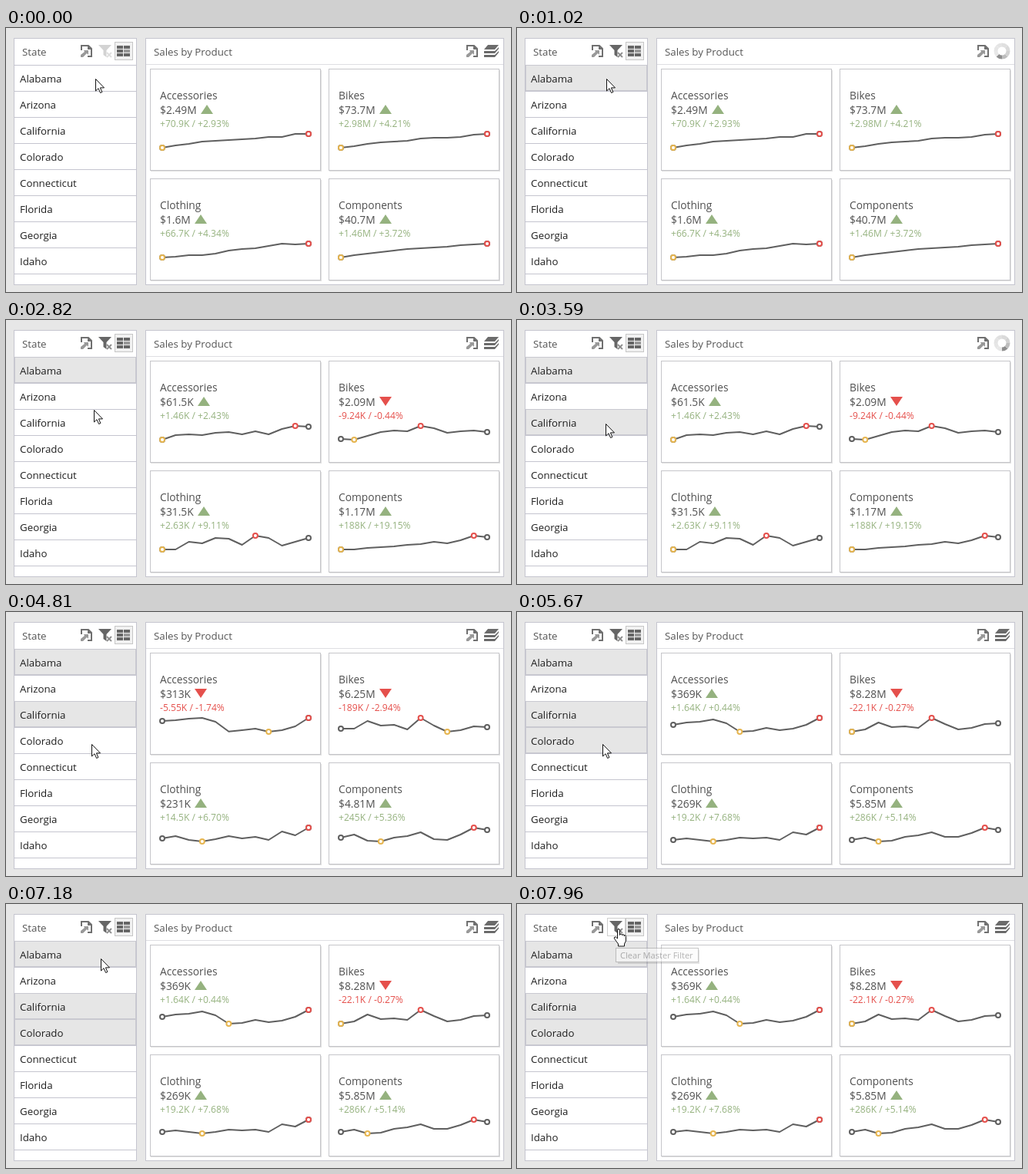
An HTML page that plays this animation: 656x344 px, repeating every 7990 ms.

```html
<!DOCTYPE html>
<html lang="en">
<head>
<meta charset="utf-8">
<title>Sales dashboard</title>
<style>
  html, body { margin: 0; width: 100%; height: 100%; overflow: hidden; background: #e7e7e7; }
  svg { display: block; }
  text { font: 13.3px "Open Sans", "Noto Sans", sans-serif; white-space: pre; }
  .head { fill: #555; }
  .row { fill: #1f1f1f; }
  .name, .value { font-size: 13.8px; fill: #505050; }
  .delta { font-size: 12.1px; }
  .tip { font-size: 11.1px; fill: #777; }
</style>
</head>
<body>
<svg width="656" height="344" viewBox="0 0 656 344">
  <defs>
    <g id="export">
      <path d="M98 29V23H107L111 27V37H106" fill="none" stroke="#707070" stroke-width="2"/>
      <path d="M106 22V28H112Z" fill="#707070"/>
      <path d="M101 29H107V35L105 33L100 38H97V35L102 31Z" fill="#999"/>
    </g>
  </defs>
  <g fill="#fff" stroke="#c5c5cf">
    <rect x="10.5" y="13.5" width="159" height="321"/>
    <rect x="181.5" y="13.5" width="465" height="321"/>
    <path d="M11 48.5H169"/>
    <path d="M182 47.5H646" stroke="#dedee2"/>
  </g>
  <text class="head" x="21" y="36">State</text>
  <text class="head" x="192" y="36">Sales by Product</text>
  <use href="#export"/>
  <use href="#export" x="501"/>
  <rect id="hover" x="117.5" y="18.5" width="23" height="23" fill="#fff" stroke="#cfcfcf"/>
  <g id="filter">
    <path d="M120 22H137L130.500 29V38L126.500 35V29Z" fill="currentColor"/>
    <path d="M131 32L137 38M137 32L131 38" stroke="currentColor" stroke-width="1.8" opacity=".75"/>
  </g>
  <rect x="141.500" y="18.500" width="23" height="23" fill="#f1f1f1" stroke="#c6c6c6"/>
  <path d="M144 23h8v4h-8zM153 23h8v4h-8zM144 28h8v4h-8zM144 33h8v4h-8zM153 33h8v4h-8z" fill="#666"/>
  <path d="M153 28h8v4h-8z" fill="#999"/>
  <g id="layers" fill="#6b6b6b">
    <path d="M626 22H640L635 28H621Z"/>
    <path d="M621 30H635L640 25V27L635 33H621Z"/>
    <path d="M621 35H635L640 30V32L635 38H621Z"/>
  </g>
  <g id="spinner" fill="none" stroke-width="5"></g>
  <g id="rows"></g>
  <g id="cards"></g>
  <g id="tip">
    <rect x="131" y="60" width="106" height="18" fill="#000" opacity=".2"/>
    <rect x="128.500" y="57.500" width="107" height="18" fill="#fafafa" stroke="#999"/>
    <text class="tip" x="134" y="71">Clear Master Filter</text>
  </g>
  <g id="cursor" fill="#fff" stroke="#111" stroke-linejoin="round">
    <path id="arrow" d="M.5 .5V16L4 12.700L6.600 18.500L8.900 17.500L6.400 11.900H11.500Z"/>
    <path id="hand" d="M-.5 13V2.200a1.500 1.500 0 0 1 3 0V8.500q0-1.500 1.500-1.500t1.500 1.500V9q0-1.300 1.400-1.300T8.300 9v1q0-1.200 1.100-1.200T10.500 10.500V16L8.500 20V23H.5V20L-4.300 13.500q-1.200-1.800 .3-2.500t3.500 2Z"/>
  </g>
</svg>
<script>
const LOOP = 7990;
const CLICKS = [990, 3590, 5440], LOADS = [1220, 3780, 5670], PICKED = [0, 2, 3];
const STATES = ["Alabama", "Arizona", "California", "Colorado", "Connecticut", "Florida", "Georgia", "Idaho"];
const PRODUCTS = ["Accessories", "Bikes", "Clothing", "Components"];
const GREEN = "#95b27f", RED = "#e5504c", GOLD = "#e6b54f", GREY = "#5f5f5f";
const $ = id => document.getElementById(id);
const show = (id, on) => $(id).setAttribute("visibility", on ? "visible" : "hidden");

// Each card: value, change, sparkline depths (0 = highest point, 18 = lowest).
const views = [];
const addView = (...cards) => views.push(cards);
addView(
  ["$2.49M", "+70.9K / +2.93%", [18, 15, 13, 10, 9, 8, 7, 6, 4, 4, 0, 0]],
  ["$73.7M", "+2.98M / +4.21%", [18, 16, 13, 11, 10, 9, 6, 5, 5, 4, 1, 0]],
  ["$1.6M", "+66.7K / +4.34%", [18, 17, 15, 15, 13, 9, 7, 6, 3, 0, 1, 0]],
  ["$40.7M", "+1.46M / +3.72%", [18, 15, 13, 11, 9, 7, 6, 5, 4, 2, 1, 0]]);
addView(
  ["$61.5K", "+1.46K / +2.43%", [18, 12, 11, 12, 9, 8, 11, 7, 11, 4, 0, 1]],
  ["$2.09M", "-9.24K / -0.44%", [17, 18, 13, 8, 6, 7, 0, 3, 9, 7, 6, 8]],
  ["$31.5K", "+2.63K / +9.11%", [18, 18, 8, 10, 3, 4, 12, 0, 3, 13, 8, 3]],
  ["$1.17M", "+188K / +19.15%", [18, 18, 16, 15, 14, 12, 11, 8, 10, 6, 0, 2]]);
addView(
  ["$313K", "-5.55K / -1.74%", [4, 3, 1, 0, 5, 17.7, 16, 14, 18, 16, 11, 0]],
  ["$6.25M", "-189K / -2.94%", [14, 14, 4, 10, 9, 15, 0, 10, 18, 16, 11, 12]],
  ["$231K", "+14.5K / +6.70%", [14, 11, 16, 18, 15, 11, 14, 12, 16, 5, 10, 0]],
  ["$4.81M", "+245K / +5.36%", [13, 9, 17, 18, 13, 11, 6, 15, 16, 9, 0, 3]]);
addView(
  ["$369K", "+1.64K / +0.44%", [9, 6, 5, 2, 7, 18, 17, 13, 16, 14, 9, 0]],
  ["$8.28M", "-22.1K / -0.27%", [18, 15, 6, 12, 11, 13, 0, 8, 15, 13, 8, 7]],
  ["$269K", "+19.2K / +7.68%", [16, 14, 16, 18, 16, 13, 14, 13, 16, 6, 9, 0]],
  ["$5.85M", "+286K / +5.14%", [16, 13, 18, 17, 12, 10, 6, 12, 12, 7, 0, 3]]);

// Cursor path: time, x, y.
const PATH = [
  [0, 116, 66], [2250, 116, 66], [2280, 116, 70], [2700, 114, 106], [3030, 115, 135],
  [4480, 115, 135], [4810, 111, 172], [6370, 111, 172], [6580, 117, 160], [7180, 123, 71],
  [7570, 131, 32], [LOOP, 131, 32]];

function cursorAt(t) {
  const i = PATH.findIndex(p => p[0] > t);
  const [t0, x0, y0] = PATH[i - 1], [t1, x1, y1] = PATH[i];
  const k = (t - t0) / (t1 - t0);
  return [Math.round(x0 + (x1 - x0) * k), Math.round(y0 + (y1 - y0) * k)];
}

function sparkline(depths) {
  const x = i => 16 + i * 190 / 11, y = i => 85 + depths[i];
  const dot = (i, color) =>
    `<circle cx="${x(i)}" cy="${y(i)}" r="3" fill="#fff" stroke="${color}" stroke-width="2"/>`;
  const line = depths.map((d, i) => `${x(i)},${y(i)}`).join(" ");
  return `<polyline points="${line}" fill="none" stroke="${GREY}" stroke-width="2" stroke-linejoin="round"/>`
    + dot(0, GREY) + dot(11, GREY) + dot(depths.indexOf(18), GOLD) + dot(depths.lastIndexOf(0), RED);
}

function drawCards(view) {
  $("cards").innerHTML = views[view].map(([value, delta, depths], i) => {
    const up = delta[0] === "+", color = up ? GREEN : RED;
    return `<g transform="translate(${187 + i % 2 * 232} ${53 + (i >> 1) * 143})">
      <rect x="1" y="2" width="222" height="132" fill="#e0e0e0"/>
      <rect x=".5" y=".5" width="221" height="132" fill="#fff" stroke="#c6c6ca"/>
      <text class="name" x="13" y="40">${PRODUCTS[i]}</text>
      <text class="value" x="13" y="59">${value}</text>
      <path class="trend" d="${up ? "M0 59L8 47L16 59Z" : "M0 47H16L8 59Z"}" fill="${color}"/>
      <text class="delta" x="13" y="76" fill="${color}">${delta}</text>
      ${sparkline(depths)}</g>`;
  }).join("");
  for (const trend of document.querySelectorAll(".trend")) {
    const width = trend.previousElementSibling.getComputedTextLength();
    trend.setAttribute("transform", `translate(${Math.round(width) + 18} 0)`);
  }
}

function drawRows(count) {
  const picked = PICKED.slice(0, count);
  $("rows").innerHTML = STATES.map((name, i) => {
    const y = 48.5 + i * 34;
    const box = picked.includes(i)
      ? `<rect x="11.5" y="${y}" width="157" height="33" fill="#e6e6e6" stroke="#c9c9d0"/>` : "";
    return `${box}<path d="M11 ${y + 34}H169" stroke="#c5c5cf"/>
      <text class="row" x="18" y="${y + 22.5}">${name}</text>`;
  }).join("");
  $("filter").setAttribute("color", count ? "#666" : "#d3d3d3");
}

const SHADES = ["#8e8e8e", "#bdbdbd", "#d2d2d2", "#dadada", "#e0e0e0", "#e4e4e4", "#e6e6e6", "#e8e8e8"];
$("spinner").innerHTML = SHADES.map((shade, i) =>
  `<path d="M8 0A8 8 0 0 1 5.657 5.657" stroke="${shade}" transform="rotate(${45 - i * 45})"/>`).join("");

let shownRows = -1, shownView = -1;
function frame() {
  const t = performance.now() % LOOP;
  const clicks = CLICKS.filter(c => c <= t).length;
  const view = LOADS.filter(l => l <= t).length;
  if (clicks !== shownRows) drawRows(shownRows = clicks);
  if (view !== shownView) drawCards(shownView = view);

  const loading = clicks > view;
  show("layers", !loading);
  show("spinner", loading);
  const turn = loading && t - CLICKS[clicks - 1] >= 30 ? 45 : 0;
  $("spinner").setAttribute("transform", `translate(630 30) rotate(${turn})`);

  const [x, y] = cursorAt(t), over = y < 42;
  $("cursor").setAttribute("transform", `translate(${x} ${y})`);
  show("arrow", !over);
  show("hand", over);
  show("hover", over);
  $("tip").setAttribute("opacity", t < 7930 ? 0 : t < 7960 ? 0.25 : 0.55);
  requestAnimationFrame(frame);
}
frame();
</script>
</body>
</html>
```
